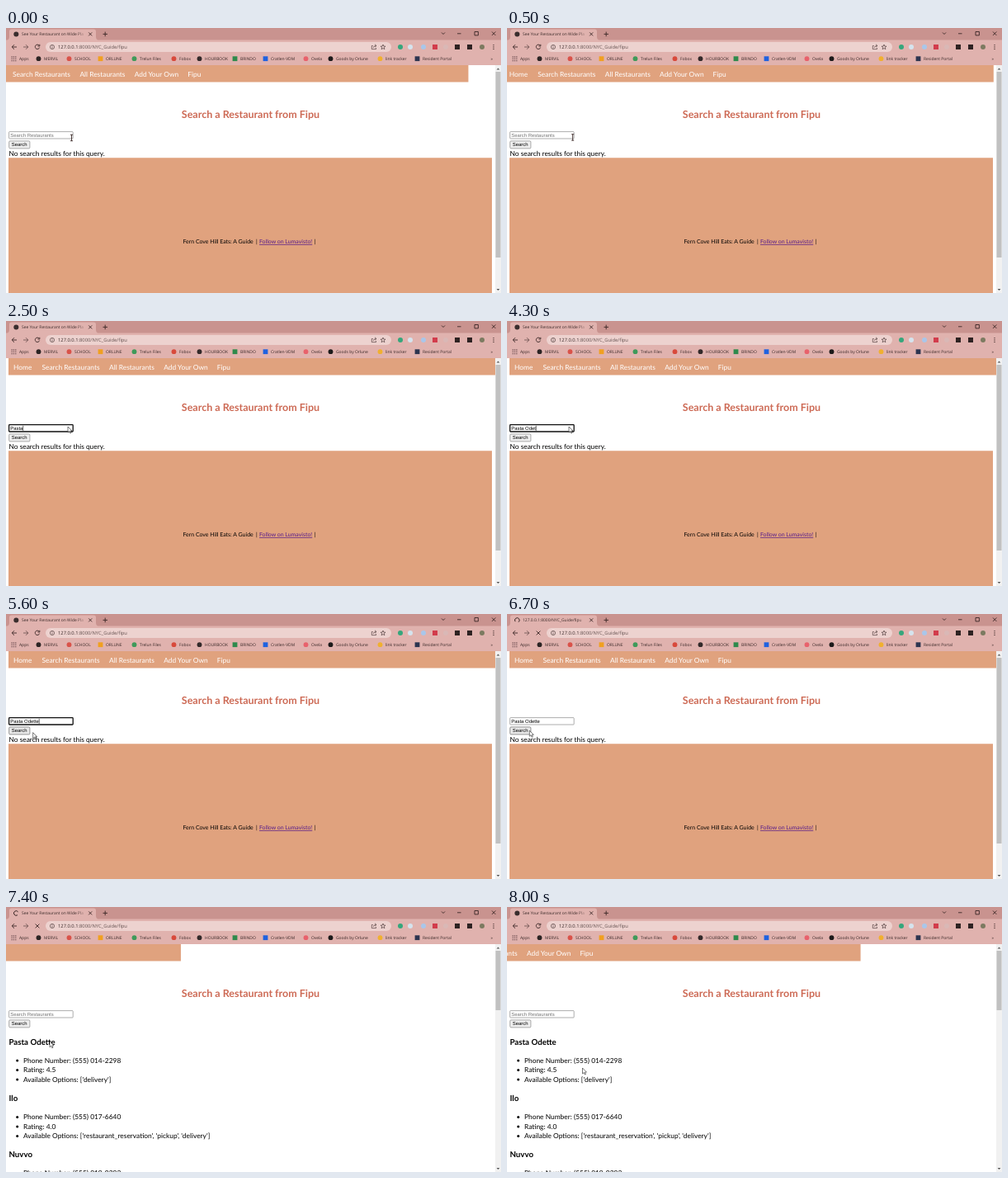
An HTML page that plays this animation: 600x321 px, repeating every 8100 ms.

```html
<!DOCTYPE html>
<html lang="en">
<head>
<meta charset="utf-8">
<title>Restaurant search</title>
<style>
  html, body { margin: 0; width: 100%; height: 100%; overflow: hidden; background: #fff; }
  svg { display: block; width: 100%; height: 100%; }
  text { white-space: pre; text-rendering: geometricPrecision; font: 8.38px Lato, sans-serif; }
  .ui { font: 4.95px "Open Sans", sans-serif; fill: #3a2928; }
  .url { font-size: 5.8px; }
  .form { font: 5.94px "Liberation Sans", Arial, sans-serif; }
  .h1 { font-weight: 700; font-size: 12.5px; fill: #cd6a55; text-anchor: middle; }
  .h3 { font-weight: 700; font-size: 9.7px; }
  .foot { font-size: 6.95px; }
  .line { fill: none; stroke: #3a2726; stroke-width: .9; }
  .soft { opacity: .65; }
  #title { fill: url(#fade); }
</style>
</head>
<body>
<svg viewBox="0 0 600 321" xmlns="http://www.w3.org/2000/svg">
  <defs>
    <linearGradient id="fade" gradientUnits="userSpaceOnUse" x1="86" x2="97" y1="0" y2="0">
      <stop stop-color="#3a2928"/><stop offset="1" stop-color="#3a2928" stop-opacity="0"/>
    </linearGradient>
    <clipPath id="page"><path d="M0 45H593V321H0Z"/></clipPath>
  </defs>

  <g clip-path="url(#page)">
    <g id="nav"></g>
    <text class="h1" x="296.5" y="108.5">Search a Restaurant from Fipu</text>
    <rect id="field" x="3.6" y="125.6" width="77.6" height="8.4" rx=".8" fill="#fff"/>
    <text id="typed" class="form" x="5.2" y="131.9"></text>
    <path id="caret" d="M.3 126.8V132.9" stroke="#000" stroke-width=".6"/>
    <rect id="button" x="3.7" y="136.9" width="25.2" height="9" rx="1.2" stroke-width=".6"/>
    <text class="form" x="6.8" y="143.4">Search</text>
    <g id="empty">
      <text x="3.5" y="155">No search results for this query.</text>
      <path d="M3 157.3H589V321H3Z" fill="#e0a27e"/>
      <text class="foot" x="214.5" y="261">Fern Cove Hill Eats: A Guide</text>
      <text class="foot" x="303" y="261">|</text>
      <text class="foot" x="307" y="261" fill="#551a8b" text-decoration="underline">Follow on Lumavisto!</text>
      <text class="foot" x="373.5" y="261">|</text>
    </g>
    <g id="results"></g>
  </g>

  <path d="M593 45H600V321H593Z" fill="#f1f1f1"/>
  <path d="M594.6 50.5L596.5 48.5L598.4 50.5ZM594.6 316L596.5 318L598.4 316Z" fill="#555"/>
  <rect id="thumb" x="593.5" y="53" width="6" fill="#c1c1c1"/>

  <path d="M0 0H600V15H0Z" fill="#c9938f"/>
  <path d="M0 14.5H600V45H0ZM2 14.5Q4 14 4 11V4Q4 1.5 7 1.5H106Q109 1.5 109 4V11Q109 14 111 14.5Z" fill="#e0b2ae"/>
  <rect x="48" y="17" width="419" height="12" rx="6" fill="#edd2cf"/>
  <circle id="favicon" cx="12.3" cy="7.5" r="3" fill="#3a2e2e"/>
  <path id="spinner" class="line" d="M0 -2.8A2.8 2.8 0 1 1 -2.8 0"/>
  <text id="title" class="ui" x="19" y="9.4"></text>
  <path class="line" d="M100.2 5.4L104.2 9.4M104.2 5.4L100.2 9.4M117.5 7.4H123M120.2 4.6V10.2
    M528 5.5L530 7.5L532 5.5M547 6.8H551.5M568 4.5H572.4V8.9H568ZM589 4.5L593.4 8.9M593.4 4.5L589 8.9
    M13 23H7.3M10 20.2L7.2 23L10 25.8"/>
  <path id="reload" class="line" d="M40 21A2.7 2.7 0 1 0 40.6 23.6M40.8 19.8V22H38.5"/>
  <path id="stop" class="line" d="M35.6 20.6L40.4 25.4M40.4 20.6L35.6 25.4"/>
  <path class="line soft" d="M21 23H26.7M24 20.2L26.8 23L24 25.8
    M53.4 23A2.6 2.6 0 0 1 58.6 23A2.6 2.6 0 0 1 53.4 23M56 22.5V24.6M56 21.2V21.9
    M444.8 21.5H443.3V25.6H448.5V24M445 24Q445.5 21.5 448.8 21.5M447 19.8L449 21.5L447 23.2
    M457 20L457.8 22.1L460 22.2L458.3 23.6L458.9 25.8L457 24.5L455.1 25.8L455.7 23.6L454 22.2L456.2 22.1Z"/>
  <text class="ui url" x="63" y="25.1">127.0.0.1<tspan fill-opacity=".75">:8000/NYC_Guide/fipu</tspan></text>
  <g id="icons"></g>
  <path d="M6.5 35H13M6.5 37.3H13M6.5 39.6H13" fill="none" stroke="#7a5a5c" stroke-width="1.3" stroke-dasharray="1.3 1"/>
  <text class="ui" x="587.5" y="39">»</text>
  <g id="pointer">
    <path id="arrow" d="M0 0V7L1.7 5.5L2.8 8L4 7.5L2.9 5.1H5Z" fill="#fff" stroke="#222" stroke-width=".6"/>
    <path id="beam" class="line" d="M-1.5 .3H1.5M0 .3V7.7M-1.5 7.7H1.5"/>
  </g>
</svg>
<script>
const LOOP = 8100, STEP = 100, FOCUS = 700, CLICK = 5700, LOADED = 6715, DONE = 7800;
const QUERY = 'Pasta Odette';
// time, letters typed
const KEYS = [[FOCUS, 0], [2000, 1], [2100, 2], [2200, 3], [2500, 5], [2800, 6],
  [4100, 8], [4200, 9], [4300, 10], [4400, 11], [4600, 12]];
// time, pointer x, y
const PATH = [[0, 79.5, 129], [900, 79.8, 128], [1900, 79.8, 128], [2000, 75, 128], [5100, 75, 128],
  [5500, 38, 146], [5700, 27.3, 141.2], [7000, 27.3, 141.2], [8000, 91.5, 195]];

const $ = id => document.getElementById(id);
const set = (id, attrs) => { for (const k in attrs) $(id).setAttribute(k, attrs[k]); };
const show = (id, on) => set(id, { visibility: on ? 'visible' : 'hidden' });
const label = (x, y, s, extra = '') => `<text x="${x}" y="${y}" ${extra}>${s}</text>`;
const dot = (x, y, r, fill) => `<circle cx="${x}" cy="${y}" r="${r}" fill="${fill}"/>`;
const square = (x, y, r, fill) => `<rect x="${x - r}" y="${y - r}" width="${2 * r}" height="${2 * r}" fill="${fill}"/>`;

$('nav').innerHTML = '<path d="M3 45H596V65.4H3Z" fill="#e0a27e"/>' +
  [[9, 'Home'], [43.5, 'Search Restaurants'], [125, 'All Restaurants'], [191.3, 'Add Your Own'], [255.8, 'Fipu']]
    .map(([x, s]) => label(x, 59, s, 'fill="#fff"')).join('');

$('results').innerHTML = [
  [QUERY, '(555) 014-2298', '4.5', "['delivery']"],
  ['Ilo', '(555) 017-6640', '4.0', "['restaurant_reservation', 'pickup', 'delivery']"],
  ['Nuvvo', '(555) 019-0293', '4.0', "['delivery']"]
].map(([name, phone, rating, options], i) => {
  const y = 166.8 + i * 68.3;
  return label(3.5, y, name, 'class="h3"') +
    ['Phone Number: ' + phone, 'Rating: ' + rating, 'Available Options: ' + options]
      .map((s, j) => dot(13.7, y + 19.3 + j * 11.5, 1.5, '#000') + label(21, y + 22 + j * 11.5, s)).join('');
}).join('');

const bookmarks = [[16, 'Apps'], [46, 'MERVIL', '#2c2424', dot], [83, 'SCHOOL', '#d9534a', dot],
  [121, 'ORLUNE', '#f0a020', square], [162, 'Trelun Files', '#3f9a5a', dot], [210, 'Fobox', '#d84a3c', dot],
  [241, 'HOURBOOK', '#332a2a', dot], [284, 'BRINDO', '#2f8a4c', square], [321, 'Cratlen-VDM', '#1f62e0', square],
  [370, 'Ovela', '#e8626c', dot], [400, 'Goods by Orlune', '#1c1a1a', dot],
  [460, 'link tracker', '#f0b030', dot], [505, 'Resident Portal', '#2d3550', square]];
const tools = [[478, '#35a67c', dot], [490, '#d5e4ee', dot], [506, '#a9c6ea', dot], [520, '#d23c4c', square],
  [533, '#d9b8b6', dot], [547, '#2e2222', square], [562, '#2e2222', square], [577, '#7c7a60', dot]];
$('icons').innerHTML =
  bookmarks.map(([x, s, c, shape]) => (shape ? shape(x - 6.5, 37.2, 2.9, c) : '') + label(x, 39, s, 'class="ui"')).join('') +
  tools.map(([x, c, shape]) => shape(x, 23, 3, c)).join('') +
  [20.6, 23, 25.4].map(y => dot(591, y, .7, '#3a2726')).join('');

// cubic-bezier(.25, .1, .25, 1)
function ease(x) {
  if (x <= 0 || x >= 1) return x <= 0 ? 0 : 1;
  const curve = (a, b, s) => 3 * a * s * (1 - s) ** 2 + 3 * b * s * s * (1 - s) + s ** 3;
  let lo = 0, hi = 1;
  for (let i = 0; i < 24; i++) {
    const mid = (lo + hi) / 2;
    if (curve(.25, .25, mid) < x) lo = mid; else hi = mid;
  }
  return curve(.1, 1, lo);
}

function pointerAt(t) {
  const i = PATH.findIndex(p => p[0] > t);
  if (i < 0) return PATH[PATH.length - 1].slice(1);
  const [a, b] = [PATH[i - 1], PATH[i]], k = (t - a[0]) / (b[0] - a[0]);
  return [a[1] + (b[1] - a[1]) * k, a[2] + (b[2] - a[2]) * k];
}

function draw(t) {
  const fresh = t >= LOADED, loading = t >= CLICK && t < DONE, focused = t >= FOCUS && t < CLICK;
  const slide = ease((t - (fresh ? LOADED : -2100)) / 3000);
  set('nav', { transform: `translate(${-600 * (1 - slide)})` });

  const key = KEYS.filter(k => k[0] <= t).pop() || [0, 0];
  const value = fresh ? '' : QUERY.slice(0, key[1]);
  $('typed').textContent = value || 'Search Restaurants';
  set('typed', { fill: value ? '#000' : '#757575' });
  set('field', { stroke: focused ? '#101010' : '#767676', 'stroke-width': focused ? 1.3 : .6 });
  const end = value ? $('typed').getComputedTextLength() : 0;
  set('caret', { transform: `translate(${5.2 + end})` });
  show('caret', focused && (t - key[0]) % 1000 < 500);

  const hover = t >= 5600 && t < 7200;
  set('button', { fill: hover ? '#e9e9e9' : '#efefef', stroke: hover ? '#555' : '#767676' });
  show('empty', !fresh);
  show('results', fresh);
  set('thumb', { height: fresh ? 72 : 225 });

  $('title').textContent = t >= CLICK && !fresh ? '127.0.0.1:8000/NYC_Guide/fipu' : 'See Your Restaurant on Wide Pla';
  show('favicon', !loading);
  show('reload', !loading);
  show('spinner', loading);
  show('stop', loading);
  set('spinner', { transform: `translate(12.3 7.5) rotate(${t * (fresh ? .36 : -.18)})` });

  set('pointer', { transform: `translate(${pointerAt(t)})` });
  show('beam', t < 2000);
  show('arrow', t >= 2000);
}

// the picture moves in steps of a tenth of a second
const start = performance.now();
function tick() {
  const t = (performance.now() - start) % LOOP;
  draw(Math.floor(t / STEP) * STEP);
  requestAnimationFrame(tick);
}
tick();
</script>
</body>
</html>
```
